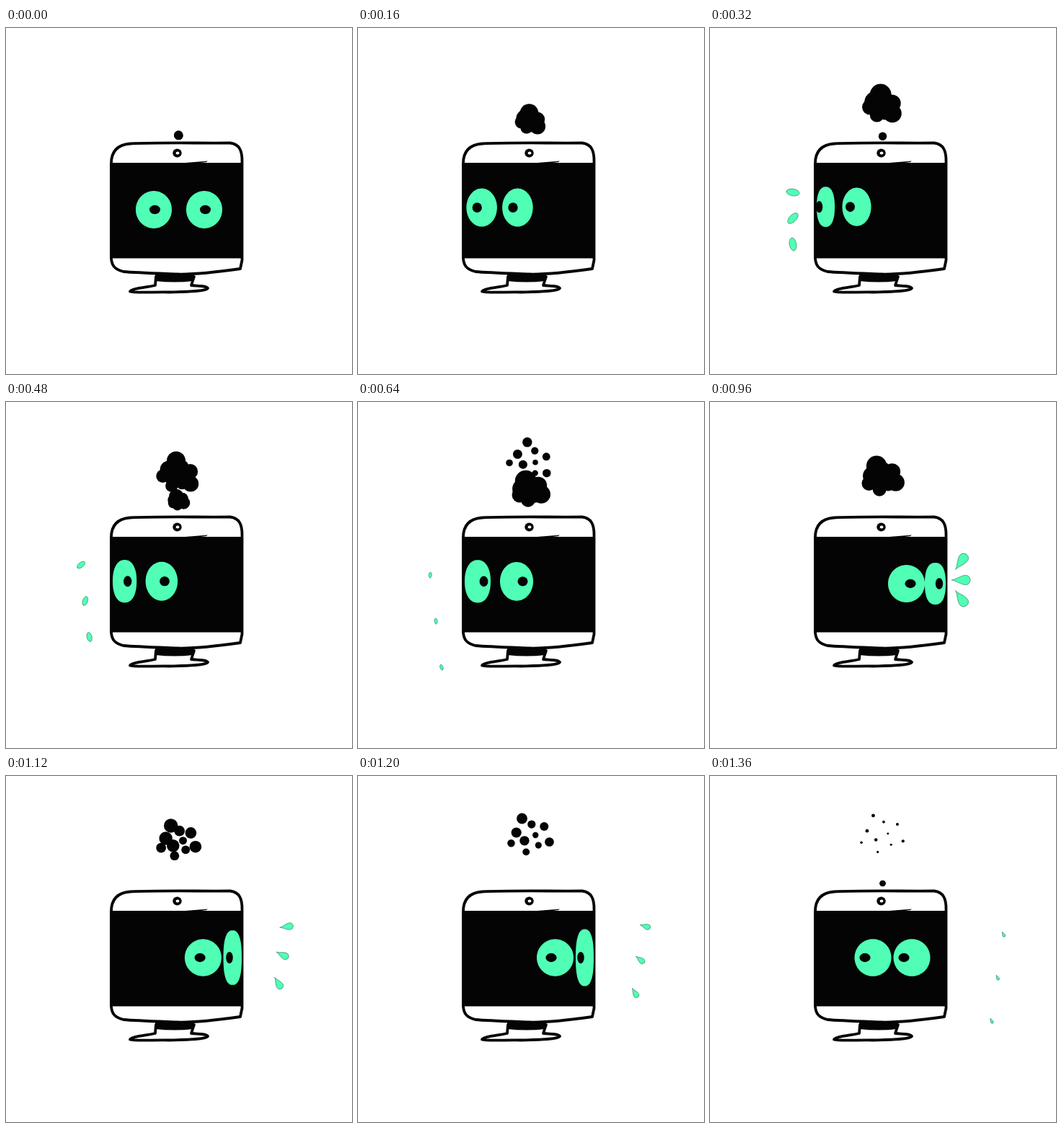
These frames come from a looping animation (480x480 px, 1.44 s). An HTML page with a canvas:

```html
<!DOCTYPE html>
<html lang="en">
<head>
<meta charset="utf-8">
<title>Curious monitor</title>
<style>
  html, body { margin: 0; width: 100%; height: 100%; overflow: hidden; background: #fff; }
  canvas { display: block; }
</style>
</head>
<body>
<canvas id="stage" width="480" height="480"></canvas>
<script>
const ctx = document.getElementById('stage').getContext('2d');
const INK = '#040404', GREEN = '#50ffb5';
const STEP = 80, STEPS = 18, TAU = Math.PI * 2, GOLDEN_ANGLE = 2.39996;
const WALL_LEFT = 148, WALL_RIGHT = 327;

const easeOut = k => k * (2 - k);

// Mixes the values of the two keys around t; each key starts with its time.
function sample(keys, t, ease = k => k) {
  const i = keys.findIndex(([at]) => at > t);
  if (i < 0) return keys.at(-1).slice(1);
  const [t0, ...from] = keys[i - 1], [t1, ...to] = keys[i];
  const k = ease((t - t0) / (t1 - t0));
  return from.map((v, j) => v + (to[j] - v) * k);
}

// Step, middle of both eyes, half distance, eye radius, stretch, pupil offset.
const gaze = [
  [0, 240, 35, 25, 0.2, 1.5],
  [4, 182, 21.5, 20, 0.1, -9],
  [8, 193, 27, 23, 0.4, 8.5],
  [10, 241, 31.5, 27, 0.2, 15],
  [12, 292.5, 20, 25.5, 0.2, 5.5],
  [15, 294, 20.5, 25.5, 0.6, -5.5],
  [17, 253, 27, 25.5, 0.4, -11],
];

// Part of life, height, spread, blob radius: a dot swells to a cloud and bursts.
const puffLife = [
  [0, 149, 0, 3.4],
  [0.08, 150.5, 0, 4.8],
  [0.33, 123, 17, 12],
  [0.46, 107.5, 18.5, 12],
  [0.6, 105, 21, 11.5],
  [0.8, 82, 30, 6],
  [1, 79, 34, 0],
];
const puffs = [{ born: -1, life: 11, turn: 0.3 }, { born: 3, life: 15, turn: 0 }];

const splashes = [
  { born: 4, last: 8, dir: -1, x: 115, y: 264, gap: 36, reach: 8, lift: 2, len: 9, tilt: 0.8, point: 0 },
  { born: 12, last: 17, dir: 1, x: 348, y: 247, gap: 25, reach: 55, lift: -3.5, len: 13, tilt: 0, point: 1 },
];

function ellipse(x, y, rx, ry, color) {
  ctx.fillStyle = color;
  ctx.beginPath();
  ctx.ellipse(x, y, rx, ry, 0, 0, TAU);
  ctx.fill();
}

// Closed outline through point(cos, sin) around the circle.
function outline(point) {
  ctx.beginPath();
  for (let a = 0; a < TAU; a += TAU / 90) ctx.lineTo(...point(Math.cos(a), Math.sin(a)));
  ctx.closePath();
  ctx.fillStyle = GREEN;
  ctx.fill();
}

// An eye flattens and grows taller and squarer against the screen's side.
function drawEye(x, y, radius, stretch, look) {
  const rx = Math.min(radius, x - WALL_LEFT, WALL_RIGHT - x);
  const ry = 26 * (25 / rx) ** stretch;
  const power = 2 / (2 + Math.max(0, 1 - rx / radius));
  const bend = v => Math.sign(v) * Math.abs(v) ** power;
  outline((c, s) => [x + rx * bend(c), y + ry * bend(s)]);
  ellipse(x + look, y, 2 + 0.22 * rx, 10 - 0.15 * rx, INK);
}

function drawEyes(s) {
  const [middle, gap, ...shape] = sample(gaze, s, easeOut);
  const y = 252 - Math.max(0, 240 - middle) / 15;
  drawEye(middle - gap, y, ...shape);
  drawEye(middle + gap, y, ...shape);
}

function drawPuff(s, { born, life, turn }) {
  const u = (s - born + STEPS) % STEPS / life;
  if (u >= 1) return;
  const [y, spread, radius] = sample(puffLife, u);
  for (let i = 0; i < 10; i++) {
    const a = i * GOLDEN_ANGLE + turn, d = spread * Math.sqrt((i + 0.5) / 10);
    const r = radius * (0.7 + 0.06 * (i * 7 % 10));
    ellipse(239.5 + d * Math.cos(a), y + d * Math.sin(a), r, r, INK);
  }
}

// Three drops fan out, slow down sideways, fall and shrink.
function drawSplash(s, { born, last, dir, x, y, gap, reach, lift, len, tilt, point }) {
  if (s < born || s > last) return;
  const age = s - born, size = len * (1 - age / 7);
  for (const k of [-1, 0, 1]) {
    ctx.save();
    ctx.translate(x + dir * (reach - 9 * k) * (1 - 0.6 ** age),
      y + gap * k + (7 * k + lift) * age + 2 * age ** 2);
    ctx.scale(dir, 1);
    ctx.rotate(tilt + 0.95 * k * (1 - age / 5) + 0.22 * age);
    outline((c, sn) => [size * c, size * sn * (0.53 + point * (0.4 * c - 0.15))]);
    ctx.lineWidth = 0.6;
    ctx.strokeStyle = '#1a6b4a';
    ctx.stroke();
    ctx.restore();
  }
}

const caseShape = new Path2D(`M146 188 C146 172 154 162 172 160.5 C215 158.5 270 160 311 159.5
  C323 161 328 169 327.5 186 L327.5 322 L325 334
  C290 339 262 342 238 341.5 C212 340.5 180 339.5 163 338 C152 335 147 331 146 320 Z`);
const foot = new Path2D(`M208 345 L207 357 C195 360 174 361 172 365.5 C178 368 205 366 226 366.5
  C246 366 276 366 280 361 C277 357 266 358 257 357 L261 345`);
const neck = new Path2D('M207 342 L261 341 L260 351 Q234 354 207 351 Z');
const smear = new Path2D('M236 188 L280 184.5 L278 186 L262 188 Z');

function drawMonitor() {
  ctx.lineJoin = ctx.lineCap = 'round';
  ctx.strokeStyle = INK;
  ctx.fillStyle = '#fff';
  ctx.lineWidth = 3.8;
  for (const shape of [foot, caseShape]) {
    ctx.fill(shape);
    ctx.stroke(shape);
  }
  ctx.fillStyle = INK;
  ctx.fillRect(144.5, 187, 184.5, 132.5);
  ctx.fill(neck);
  ctx.fill(smear);
  ellipse(237.5, 173.5, 6.2, 6, INK);
  ellipse(238, 173.5, 2.4, 2, '#fff');
}

function draw(now) {
  const s = Math.floor(now / STEP) % STEPS;
  ctx.fillStyle = '#fff';
  ctx.fillRect(0, 0, 480, 480);
  drawMonitor();
  drawEyes(s);
  for (const splash of splashes) drawSplash(s, splash);
  for (const puff of puffs) drawPuff(s, puff);
}

const start = performance.now();
function tick() {
  draw(performance.now() - start);
  requestAnimationFrame(tick);
}
tick();
</script>
</body>
</html>
```
